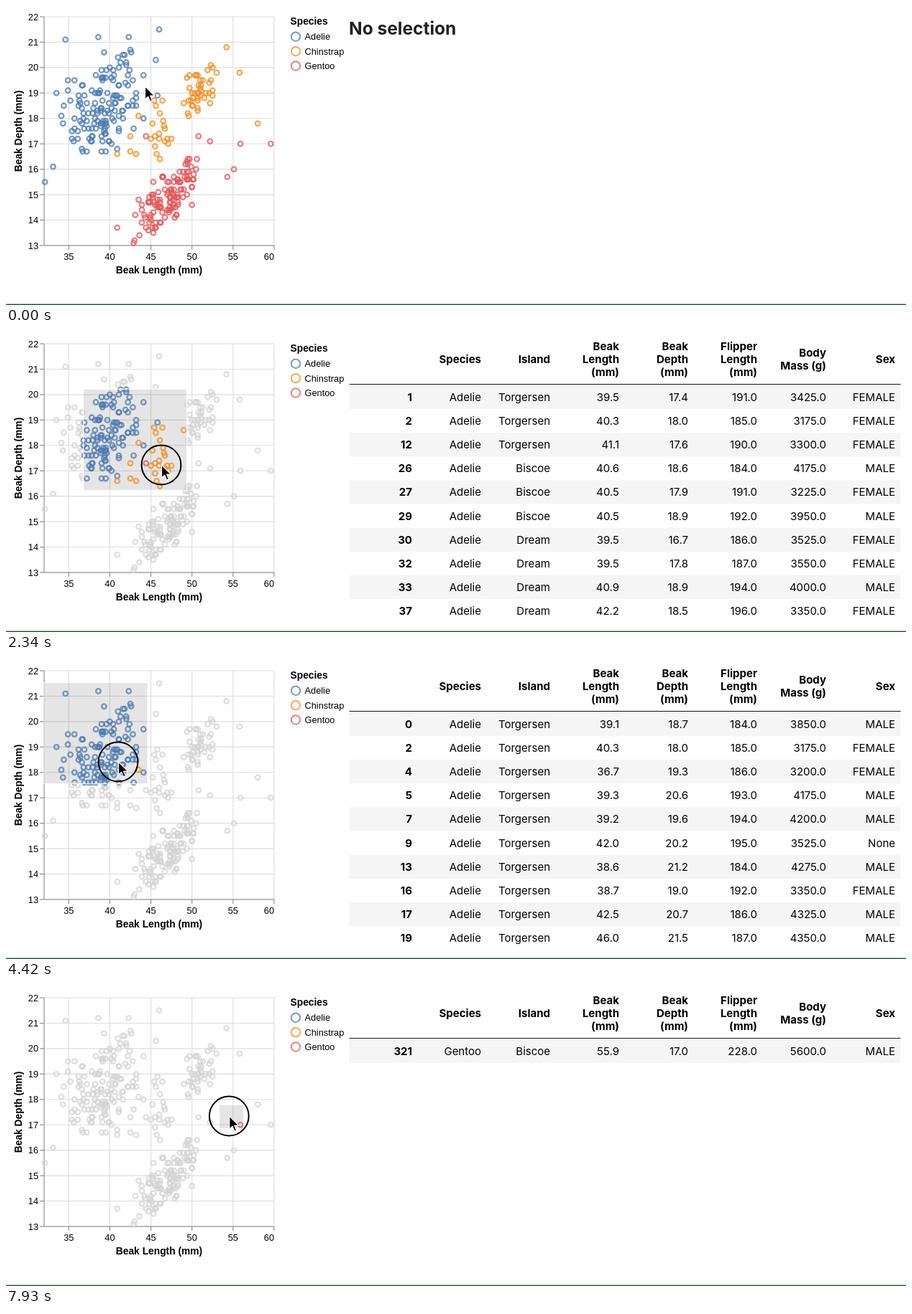
These frames come from a looping animation (1252 px wide and 417 px high, 8 s). An HTML page:

```html
<!DOCTYPE html>
<html lang="en">
<head>
<meta charset="utf-8">
<title>Penguin brush</title>
<style>
  html, body { margin: 0; width: 100%; height: 100%; overflow: hidden; background: #fff; }
  svg { display: block; width: 100vw; height: 100vh; }
  .chart text { font: 12.8px "Liberation Sans", Arial, sans-serif; }
  .chart .title { font-size: 13.8px; font-weight: bold; }
  .table text { font: 15px Inter, sans-serif; text-anchor: end; }
  .table .bold { font-weight: 700; }
  .empty { font: 700 24.5px Inter, sans-serif; fill: #212121; }
</style>
</head>
<body>
<svg id="stage" viewBox="0 0 1252 417"></svg>
<script>
const LOOP = 8000, STEP = 130, TABLE_LAG = 260, BRUSH_LAG = 50;
const SEX = { M: 'MALE', F: 'FEMALE', N: 'None' };

// cloud: mean and spread of length, mean and spread of depth, slope
const SPECIES = {
  Adelie: {
    color: '#4c7aad', first: 0, count: 151, mass: 3750, flipper: 190,
    clouds: [[38.7, 2.2, 18.35, .95, .16]],
    outliers: [[34.6, 21.1], [42.3, 21.2], [45.6, 20.3], [44.1, 19.7], [33.5, 19], [33.1, 16.1], [32.1, 15.5]]
  },
  Chinstrap: {
    color: '#ee8d25', first: 152, count: 68, mass: 3650, flipper: 192,
    clouds: [[46.5, .85, 17.5, .6, .3], [50.9, 1.05, 19.2, .5, .25], [50.9, 1.05, 19, .6, .25]],
    outliers: [[54.2, 20.8], [55.8, 19.8], [58, 17.8], [43.5, 18.1], [42.5, 17.3], [42.5, 16.7], [43.2, 16.6], [40.9, 16.6]]
  },
  Gentoo: {
    color: '#dc585a', first: 220, count: 123, mass: 5425, flipper: 223,
    clouds: [[47.3, 2.2, 15, .58, .25]],
    outliers: [[59.6, 17], [55.1, 16], [54.3, 15.7], [52.2, 17.1], [50.8, 17.3], [44.4, 17.3], [40.9, 13.7], [42.9, 13.1]]
  }
};

// Birds named in the table: id, beak length, beak depth, sex
const RECORDS = {
  'Adelie Torgersen': `0 39.1 18.7 M|1 39.5 17.4 F|2 40.3 18.0 F|4 36.7 19.3 F|5 39.3 20.6 M|6 38.9 17.8 F
    |7 39.2 19.6 M|8 34.1 18.1 N|9 42.0 20.2 N|10 37.8 17.1 N|11 37.8 17.3 N|12 41.1 17.6 F|13 38.6 21.2 M
    |15 36.6 17.8 F|16 38.7 19.0 F|17 42.5 20.7 M|19 46.0 21.5 M|73 45.8 18.9 M|75 42.8 18.5 M|81 42.9 17.6 M
    |122 40.2 17.0 F|129 44.1 18.0 M`,
  'Adelie Biscoe': '26 40.6 18.6 M|27 40.5 17.9 F|29 40.5 18.9 M|65 41.6 18.0 M|109 43.2 19.0 M',
  'Adelie Dream': `30 39.5 16.7 F|32 39.5 17.8 F|33 40.9 18.9 M|37 42.2 18.5 F|76 40.9 16.8 F|91 41.1 18.1 M
    |99 43.2 18.5 M|135 41.1 17.5 M`,
  'Chinstrap Dream': '152 46.5 17.9 F|155 45.4 18.7 F|157 45.2 17.8 F|158 46.1 18.2 F',
  'Gentoo Biscoe': '321 55.9 17.0 M'
};

let seed = 7;
function rand() {
  seed = (seed + 0x6D2B79F5) | 0;
  let r = Math.imul(seed ^ (seed >>> 15), 1 | seed);
  r = (r + Math.imul(r ^ (r >>> 7), 61 | r)) ^ r;
  return ((r ^ (r >>> 14)) >>> 0) / 4294967296;
}
// Roughly normal, never beyond two deviations
function spread() {
  const g = (rand() + rand() + rand() - 1.5) * 2;
  return Math.abs(g) < 2.1 ? g : spread();
}
const tenth = v => Math.round(v * 10) / 10;

function cloudPoint(clouds) {
  const [mx, sx, my, sy, slope] = clouds[Math.floor(rand() * clouds.length)];
  const x = tenth(mx + sx * spread());
  const y = tenth(my + slope * (x - mx) + sy * spread());
  const gap = x > 40 && x < 45 && y > 16.5 && y < 18.2;
  return gap ? cloudPoint(clouds) : [x, y];
}

function makeBird(id, species, island, x, y, sex, known) {
  const s = SPECIES[species], sway = sex === 'M' ? 350 : -350;
  return {
    id, species, island, x, y, known, sex: SEX[sex],
    flipper: s.flipper + id * 7 % 13 - 6,
    mass: s.mass + sway + 25 * (id * 11 % 21 - 10)
  };
}

function buildBirds() {
  const birds = new Map();
  for (const [key, text] of Object.entries(RECORDS)) {
    for (const item of text.split('|')) {
      const [id, x, y, sex] = item.trim().split(' ');
      birds.set(+id, makeBird(+id, ...key.split(' '), +x, +y, sex, true));
    }
  }
  for (const [name, s] of Object.entries(SPECIES)) {
    const rest = s.outliers.slice();
    for (let id = s.first; id < s.first + s.count; id++) {
      if (birds.has(id)) continue;
      const [x, y] = rest.pop() || cloudPoint(s.clouds);
      birds.set(id, makeBird(id, name, name === 'Gentoo' ? 'Biscoe' : 'Dream', x, y, id % 2 ? 'F' : 'M', false));
    }
  }
  return [...birds.values()].sort((a, b) => a.id - b.id);
}

const NS = 'http://www.w3.org/2000/svg';
const set = (node, attrs) => { for (const k in attrs) node.setAttribute(k, attrs[k]); };
const show = (node, on) => node.setAttribute('visibility', on ? 'visible' : 'hidden');
function el(parent, tag, attrs = {}, text) {
  const node = document.createElementNS(NS, tag);
  set(node, attrs);
  if (text !== undefined) node.textContent = text;
  return parent.appendChild(node);
}

const px = v => 53 + (v - 32) * 320 / 28;
const py = v => 15 + (22 - v) * 319 / 9;
const stage = document.getElementById('stage');
const birds = buildBirds();

// Chart
const chart = el(stage, 'g', { class: 'chart' });
const line = (x1, y1, x2, y2, stroke) => el(chart, 'line', { x1, y1, x2, y2, stroke, 'stroke-width': 1.1 });
const label = (x, y, text, anchor, cls = '') => el(chart, 'text', { x, y, class: cls, 'text-anchor': anchor }, text);

for (let v = 35; v <= 60; v += 5) line(px(v), 15, px(v), 334, '#ddd');
for (let v = 13; v <= 22; v++) line(53, py(v), 373, py(v), '#ddd');
for (let v = 35; v <= 60; v += 5) {
  line(px(v), 334, px(v), 340, '#888');
  label(px(v), 354, v, v === 60 ? 'end' : 'middle');
}
for (let v = 13; v <= 22; v++) {
  line(47, py(v), 53, py(v), '#888');
  label(45, py(v) + 4.5, v, 'end');
}
line(53, 15, 53, 334, '#888');
line(53, 334, 373, 334, '#888');
label(213, 373, 'Beak Length (mm)', 'middle', 'title');
label(0, 0, 'Beak Depth (mm)', 'middle', 'title').setAttribute('transform', 'translate(22 174.5) rotate(-90)');

label(395.5, 26, 'Species', 'start', 'title');
Object.entries(SPECIES).forEach(([name, s], i) => {
  const y = 42.7 + 20.4 * i;
  el(chart, 'circle', { cx: 403, cy: y, r: 6.2, fill: 'none', stroke: s.color, 'stroke-width': 2, opacity: .75 });
  label(415.5, y + 4.4, name, 'start');
});

const brushFill = el(chart, 'rect', { fill: '#333', 'fill-opacity': .125 });
for (const b of birds)
  b.dot = el(chart, 'circle', { cx: px(b.x), cy: py(b.y), r: 3.3, fill: 'none', 'stroke-width': 2.3, opacity: .75 });
const brushEdge = el(chart, 'rect', { fill: 'none', stroke: '#fff', 'stroke-width': 1 });

// Table
const empty = el(stage, 'text', { x: 477, y: 40, class: 'empty' }, 'No selection');
const table = el(stage, 'g', { class: 'table' });
const HEADS = ['', 'Species', 'Island', 'Beak|Length|(mm)', 'Beak|Depth|(mm)', 'Flipper|Length|(mm)', 'Body|Mass (g)', 'Sex'];
const right = c => 565 + 96 * c;
HEADS.forEach((head, c) => {
  const parts = head.split('|');
  parts.forEach((part, i) =>
    el(table, 'text', { x: right(c), y: 42.3 + 18 * (i - (parts.length - 1) / 2), class: 'bold' }, part));
});
const rows = Array.from({ length: 10 }, (_, i) => {
  const g = el(table, 'g'), mid = 89.3 + 33.17 * i;
  if (i % 2 === 0) el(g, 'rect', { x: 477.5, y: mid - 16.6, width: 767, height: 33.2, fill: '#f5f5f5' });
  const cells = HEADS.map((_, c) => el(g, 'text', { x: right(c), y: mid + 5.4, class: c ? '' : 'bold' }));
  return { g, cells };
});
el(table, 'line', { x1: 477.5, y1: 71.5, x2: 1244.5, y2: 71.5, stroke: '#111', 'stroke-width': 1.2 });
el(stage, 'rect', { x: 0, y: 415.6, width: 1252, height: 1.4, fill: '#14591f' });

// Pointer
const ring = el(stage, 'circle', { r: 27.4, fill: 'none', stroke: '#000', 'stroke-width': 2 });
const arrow = el(stage, 'path', {
  d: 'M0 0V18.2L4.2 14.3L7 20.9L9.9 19.7L7.1 13.2H13Z',
  fill: '#000', stroke: '#fff', 'stroke-width': 1.2, 'stroke-linejoin': 'round'
});

// Pointer path: time, x, y
const PATH = [
  [0, 193, 112], [260, 176, 120], [390, 176, 120], [1170, 320, 261], [1300, 320, 261], [1560, 290, 228],
  [2030, 251, 198], [2340, 216, 184], [2650, 176, 194], [2940, 189, 215], [3250, 227, 259],
  [3640, 280, 232], [4110, 204, 127], [4420, 156, 142], [5460, 188.5, 192], [6500, 188.5, 192],
  [7280, 305, 190], [7540, 305, 190], [7930, 310.3, 180]
];
// Brush under the pointer: time, pointer's place inside it, width
const GRIP = [
  [390, 0, 0, 0], [1170, 144, 141, 144], [1300, 144, 141, 144], [1560, 114, 108, 144],
  [5590, 114, 108, 144], [6240, 42, 40, 53.4], [6500, 42, 40, 53.4], [6890, 13, 17, 34]
];
const isPressed = t => (t >= 390 && t < 1170) || (t >= 1560 && t < 5500) || t >= 6890;

function track(keys, t) {
  const i = keys.findIndex(k => k[0] > t);
  const b = keys[i < 0 ? keys.length - 1 : i], a = keys[i < 1 ? keys.length - 1 : i - 1];
  if (i < 1) return (i < 0 ? a : b).slice(1);
  const u = (t - a[0]) / (b[0] - a[0]);
  return a.slice(1).map((v, j) => v + (b[j + 1] - v) * u);
}

function brushAt(time) {
  const t = Math.max(0, time - BRUSH_LAG);
  const [x, y] = track(PATH, t), [gx, gy, w] = track(GRIP, t);
  return { x: Math.max(53, x - gx), y: Math.max(15, y - gy), width: w, height: w * .98 };
}

function hits(box, b) {
  const dx = px(b.x) - box.x, dy = py(b.y) - box.y;
  return box.width > 0 && dx >= 0 && dx <= box.width && dy >= 0 && dy <= box.height;
}

function drawTable(box) {
  const picked = birds.filter(b => hits(box, b));
  const shown = [...picked.filter(b => b.known), ...picked.filter(b => !b.known)]
    .slice(0, 10).sort((a, b) => a.id - b.id);
  show(empty, !shown.length);
  table.style.display = shown.length ? '' : 'none';
  rows.forEach(({ g, cells }, i) => {
    const b = shown[i];
    show(g, b);
    if (!b) return;
    const numbers = [b.x, b.y, b.flipper, b.mass].map(v => v.toFixed(1));
    [b.id, b.species, b.island, ...numbers, b.sex].forEach((v, c) => { cells[c].textContent = v; });
  });
}

function draw(t) {
  const box = brushAt(t), active = box.width > 0;
  for (const rect of [brushFill, brushEdge]) {
    show(rect, active);
    set(rect, box);
  }
  for (const b of birds)
    b.dot.setAttribute('stroke', !active || hits(box, b) ? SPECIES[b.species].color : '#d3d3d3');
  drawTable(brushAt(t - TABLE_LAG));
  const [x, y] = track(PATH, t);
  arrow.setAttribute('transform', `translate(${x + .5} ${y})`);
  set(ring, { cx: x, cy: y });
  show(ring, isPressed(t));
}

let last = 0;
function tick(now) {
  const step = Math.floor((now % LOOP) / STEP);
  if (step !== last) draw((last = step) * STEP);
  requestAnimationFrame(tick);
}
draw(0);
requestAnimationFrame(tick);
</script>
</body>
</html>
```
